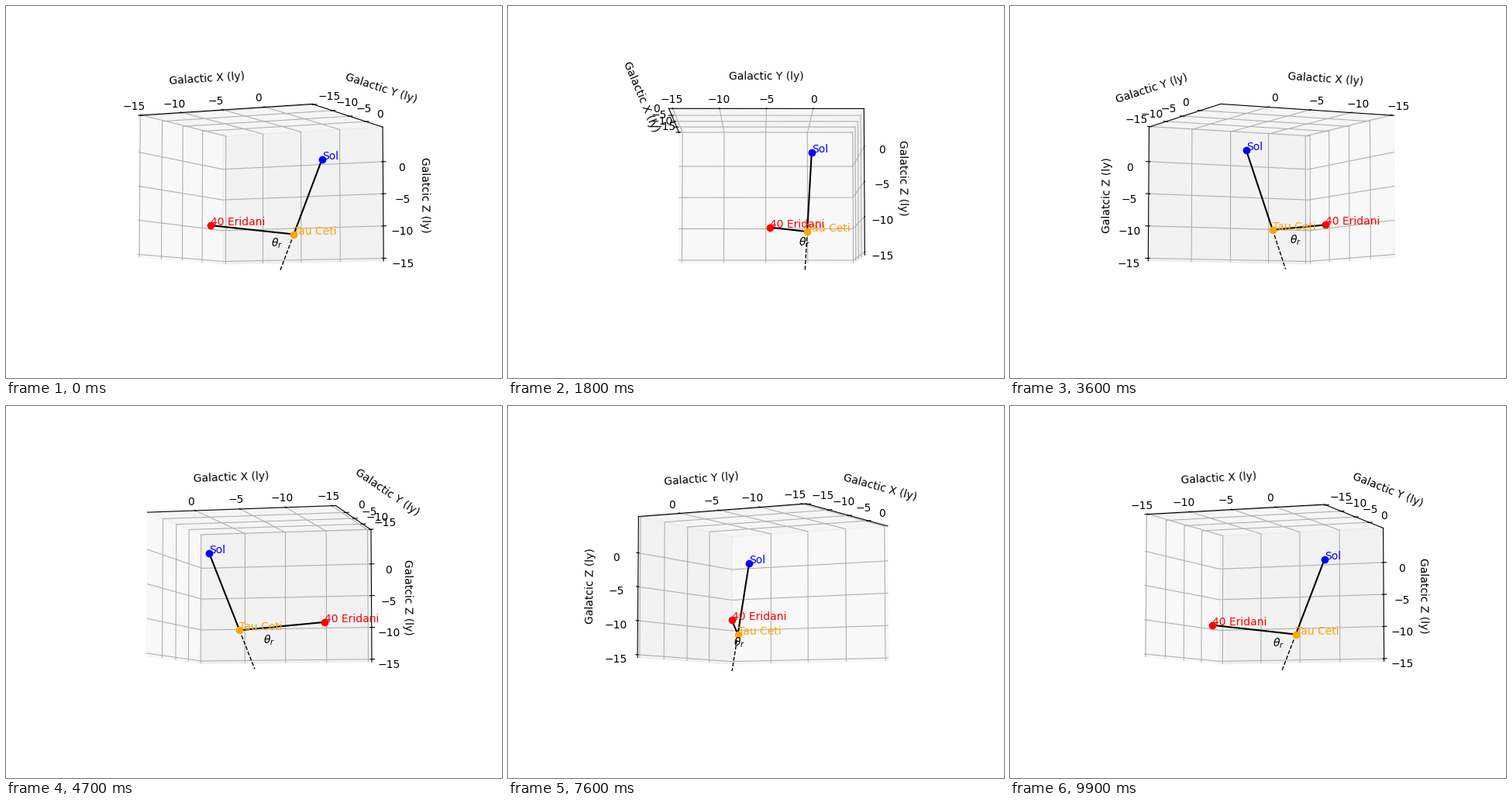
Recreate the animation shown at these times as a matplotlib script. Size 640 px wide and 480 px high, loop 10 s.

```python
import matplotlib.pyplot as plt
import numpy as np
from matplotlib.animation import FuncAnimation

FRAMES = 100
INTERVAL = 100
ELEV, START_AZIM = -5, -65

SOL = np.zeros(3)
TAU = np.array([-3.37, -0.41, -11.41])
ERI = np.array([-12.03, -4.56, -10.05])
ANGLE_POS = (-5.87, -1.3, -13.35)

fig = plt.figure(figsize=(6.4, 4.8), dpi=100)
ax = fig.add_subplot(projection="3d")


def segment(a, b, **style):
    ax.plot(*np.column_stack([a, b]), color="black", **style)


def star(pos, name, color):
    ax.plot(*pos[:, None], "o", color=color)
    ax.text(*pos, name, color=color)


segment(SOL, TAU)
segment(TAU, ERI)
segment(TAU, 1.5 * TAU, lw=1, ls="--")

star(SOL, "Sol", "blue")
star(TAU, "Tau Ceti", "orange")
star(ERI, "40 Eridani", "red")
ax.text(*ANGLE_POS, r"$\theta_r$")

# Limits of -15..5 with a 1/48 margin on each side
margin = 20 / 48
limits = (-15 - margin, 5 + margin)
ticks = [-15, -10, -5, 0]
ax.set(xlim=limits, ylim=limits, zlim=limits,
       xticks=ticks, yticks=ticks, zticks=ticks,
       xlabel="Galactic X (ly)", ylabel="Galactic Y (ly)",
       zlabel="Galatcic Z (ly)")


def update(i):
    ax.view_init(elev=ELEV, azim=START_AZIM + 360 * i / FRAMES)
    return []


update(0)
anim = FuncAnimation(fig, update, frames=FRAMES, interval=INTERVAL,
                     repeat=True, repeat_delay=0)
plt.show()
```
